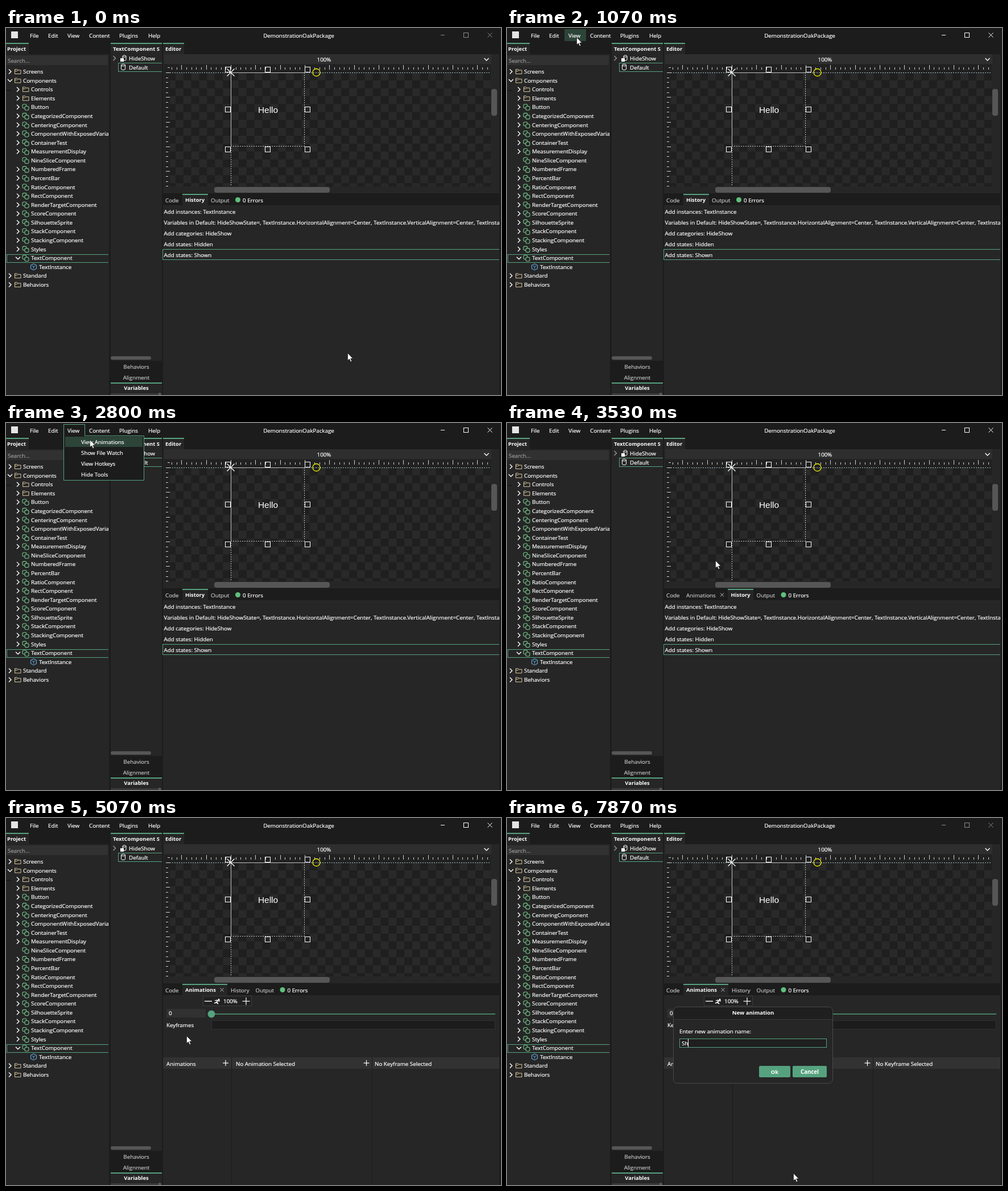
Animation of 870 by 644 pixels, one loop 8000 ms. Source, as an HTML page with a canvas:

```html
<!DOCTYPE html>
<html lang="en">
<head>
<meta charset="utf-8">
<title>Animation editor</title>
<style>
html, body { margin: 0; width: 100%; height: 100%; overflow: hidden; background: #1c1c1c; }
canvas { display: block; width: 870px; height: 644px; }
</style>
</head>
<body>
<canvas id="stage" width="870" height="644"></canvas>
<script>
const ctx = document.getElementById('stage').getContext('2d');
const LOOP = 8000, STEP = 1000 / 15;
const SANS = '"Open Sans", "Noto Sans", sans-serif';
const C = {
  chrome: '#1c1c1c', panel: '#262626', field: '#313131', green: '#56a27f', hover: '#2d4439',
  text: '#ffffff', soft: '#c4c4c4', dim: '#8a8a8a', thumb: '#565656', folder: '#d9c79c',
  component: '#74c78c', cube: '#62a8dc', error: '#e88282'
};

function rect(x, y, w, h, color) {
  ctx.fillStyle = color;
  ctx.fillRect(x, y, w, h);
}

function frame(x, y, w, h, color) {
  ctx.strokeStyle = color;
  ctx.lineWidth = 1;
  ctx.strokeRect(x + 0.5, y + 0.5, w - 1, h - 1);
}

function pill(x, y, w, h, r, color) {
  ctx.fillStyle = color;
  ctx.beginPath();
  ctx.roundRect(x, y, w, h, r);
  ctx.fill();
}

function disc(x, y, r, color) {
  ctx.fillStyle = color;
  ctx.beginPath();
  ctx.arc(x, y, r, 0, 7);
  ctx.fill();
}

// Points are a flat list: x, y, x, y ...
function line(points, color, width = 1, dash = []) {
  ctx.strokeStyle = color;
  ctx.lineWidth = width;
  ctx.setLineDash(dash);
  ctx.beginPath();
  for (let i = 0; i < points.length; i += 2) ctx.lineTo(points[i], points[i + 1]);
  ctx.stroke();
  ctx.setLineDash([]);
}

// y is the middle of the capital letters; a hairline stroke firms up the small type.
function label(s, x, y, { color = C.text, bold = false, size = bold ? 9.4 : 9.8, align = 'left' } = {}) {
  const base = Math.round(y + size * 0.36);
  ctx.font = `${bold ? 700 : 400} ${size}px ${SANS}`;
  ctx.textAlign = align;
  ctx.fillStyle = ctx.strokeStyle = color;
  ctx.lineWidth = 0.22;
  ctx.fillText(s, x, base);
  if (!bold) ctx.strokeText(s, x, base);
}

function clipped(x, y, w, h, draw) {
  ctx.save();
  ctx.beginPath();
  ctx.rect(x, y, w, h);
  ctx.clip();
  draw();
  ctx.restore();
}

function chevron(x, y, open, color = C.text) {
  line(open ? [x - 4, y - 2, x, y + 2, x + 4, y - 2] : [x - 2, y - 4, x + 2, y, x - 2, y + 4], color, 1.4);
}

function plus(x, y, r, color = C.text) {
  line([x - r, y, x + r, y], color, 1.2);
  line([x, y - r, x, y + r], color, 1.2);
}

function cross(x, y, r, color, width = 1) {
  line([x - r, y - r, x + r, y + r], color, width);
  line([x - r, y + r, x + r, y - r], color, width);
}

function activeTab(x, y, w, h) {
  rect(x, y, w, h, C.panel);
  rect(x, y, w, 2, C.green);
}

const icons = {
  folder(x, y) {
    line([x - 5, y + 4, x - 5, y - 4, x - 1, y - 4, x + 0.5, y - 2.5, x + 5.5, y - 2.5,
      x + 5.5, y + 4, x - 5, y + 4, x - 5, y - 1, x - 1, y - 1, x + 0.5, y - 2.5], C.folder);
  },
  component(x, y) {
    ctx.strokeStyle = C.component;
    ctx.lineWidth = 1.1;
    ctx.beginPath();
    ctx.roundRect(x - 5.5, y - 5, 7, 7, 2.5);
    ctx.stroke();
    ctx.beginPath();
    ctx.roundRect(x - 1.5, y - 1.5, 7, 7, 2.5);
    ctx.fillStyle = C.panel;
    ctx.fill();
    ctx.stroke();
  },
  cube(x, y) {
    line([x, y - 5.5, x + 5, y - 3, x + 5, y + 3, x, y + 5.5, x - 5, y + 3, x - 5, y - 3, x, y - 5.5], C.cube, 1.1);
    line([x - 3, y - 2, x, y - 0.5, x + 3, y - 2], C.cube);
    line([x, y - 0.5, x, y + 3], C.cube);
  },
  drum(x, y, r = 3.5) {
    ctx.strokeStyle = C.text;
    ctx.lineWidth = 1;
    ctx.beginPath();
    ctx.ellipse(x, y - r, r, 1.6, 0, 0, 7);
    ctx.moveTo(x - r, y - r);
    ctx.lineTo(x - r, y + r);
    ctx.ellipse(x, y + r, r, 1.6, 0, Math.PI, 0, true);
    ctx.lineTo(x + r, y - r);
    ctx.stroke();
  },
  runner(x, y) {
    disc(x + 3, y - 3.5, 1.5, C.text);
    line([x - 4, y - 1, x - 1, y - 2.5, x + 2, y - 1, x + 5, y - 1], C.text, 1.3);
    line([x + 1, y - 2, x - 1, y + 1.5, x + 2, y + 4], C.text, 1.8);
    line([x - 1, y + 1.5, x - 5, y + 3], C.text, 1.5);
  }
};

const components = ['Button', 'CategorizedComponent', 'CenteringComponent', 'ComponentWithExposedVariable',
  'ContainerTest', 'MeasurementDisplay', 'NineSliceComponent', 'NumberedFrame', 'PercentBar', 'RatioComponent',
  'RectComponent', 'RenderTargetComponent', 'ScoreComponent', 'SilhouetteSprite', 'StackComponent',
  'StackingComponent', 'Styles', 'TextComponent'];
const tree = [
  [0, 'Screens', 'folder'], [0, 'Components', 'folder'], [1, 'Controls', 'folder'], [1, 'Elements', 'folder'],
  ...components.map(name => [1, name, 'component']),
  [2, 'TextInstance', 'cube'], [0, 'Standard', 'folder'], [0, 'Behaviors', 'folder']
];
const leaves = ['NineSliceComponent', 'TextInstance'];
const opened = ['Components', 'TextComponent'];

function drawTitleBar(bright) {
  rect(9, 6, 12, 12, '#e4e4e4');
  const menu = { File: 42, Edit: 74, View: 108, Content: 146, Plugins: 199, Help: 250 };
  for (const name in menu) label(name, menu[name], 13);
  label('DemonstrationOakPackage', 514.5, 13, { align: 'center' });
  const color = bright ? C.text : C.dim;
  line([764, 12.5, 771, 12.5], color);
  frame(804, 8, 9, 9, color);
  cross(850.5, 12.5, 4, color);
}

function drawProject() {
  rect(0, 46, 181, 598, C.panel);
  activeTab(0, 26, 40, 21);
  label('Project', 2, 36.5, { bold: true });
  rect(0, 48, 179, 17, C.field);
  label('Search...', 3, 57, { color: '#9c9c9c' });
  rect(0, 109, 9, 1, '#101010');
  clipped(0, 66, 180, 578, () => {
    tree.forEach(([depth, name, icon], i) => {
      const y = 76.5 + i * 15.58, x = 7 + depth * 14;
      if (name === 'TextComponent') frame(1, 397, 190, 15, C.green);
      if (!leaves.includes(name)) chevron(x, y, opened.includes(name));
      icons[icon](x + 13.5, y);
      label(name, x + 23, y);
    });
  });
}

function drawStates() {
  rect(184, 46, 90, 538, C.panel);
  activeTab(184, 26, 90, 21);
  clipped(184, 26, 86, 20, () => label('TextComponent States', 188, 36.5, { bold: true }));
  chevron(190.5, 53, false, '#999');
  icons.drum(208, 52.5, 3);
  rect(201, 53, 6, 6, C.text);
  label('HideShow', 216, 53.5);
  clipped(190, 58, 84, 22, () => frame(197, 61, 90, 16, C.green));
  icons.drum(206, 68.5);
  label('Default', 216, 69);
  pill(184, 576, 71, 6, 3, C.thumb);
  label('Behaviors', 229, 594, { color: C.soft, align: 'center' });
  label('Alignment', 229, 613, { color: C.soft, align: 'center' });
  activeTab(184, 622, 90, 22);
  label('Variables', 229, 632, { bold: true, align: 'center' });
  rect(184, 641, 82, 3, '#3a3a3a');
  disc(270, 643, 3, C.thumb);
}

function drawEditor() {
  rect(276, 46, 591, 244, C.panel);
  activeTab(276, 26, 37, 21);
  label('Editor', 280, 36.5, { bold: true });
  rect(278, 46, 575, 17, '#2e2e2e');
  label('100%', 559, 55, { align: 'center' });
  chevron(844.5, 55, true);

  const ox = 395, oy = 78, cell = 13.87, tick = 8.667;
  const ruler = '#d0d0d0', guide = '#c4c4c4', dots = [2, 2];
  clipped(278, 64, 574, 214, () => {
    rect(278, 64, 574, 214, '#1f1f1f');
    ctx.fillStyle = '#292929';
    for (let r = 0; r < 15; r++)
      for (let c = -8; c < 34; c++)
        if ((r + c) % 2) ctx.fillRect(ox + c * cell, oy + r * cell, cell, cell);
    rect(278, 64, 574, 13, '#212121');
    rect(278, 64, 10, 214, '#212121');
    for (let i = -12; i < 53; i++) {
      const x = Math.round(ox + i * tick) + 0.5;
      line([x, i % 5 ? 69 : 65, x, 73], ruler);
    }
    for (let i = 0; i < 24; i++) {
      const y = Math.round(oy + i * tick) + 0.5;
      line([281, y, i % 5 ? 285 : 288, y], ruler);
    }
    line([284, 69.5, 288, 69.5], ruler);
    line([288, 78.5, 852, 78.5], '#a9c4cc', 1, dots);
    line([395.5, 78, 395.5, 278], guide, 1, dots);
  });
  line([525, 78.5, 395.5, 78.5, 395.5, 208], guide);
  line([395, 207.5, 525, 207.5], guide, 1, dots);
  line([524.5, 78, 524.5, 208], guide, 1, dots);
  for (const x of [390, 460, 530])
    for (const y of [73, 143, 213])
      if (x !== 460 || y !== 143) frame(x - 5, y - 5, 10, 10, '#fff');
  cross(395, 78, 6.5, '#fff', 1.2);
  ctx.strokeStyle = '#f4f000';
  ctx.lineWidth = 1.3;
  ctx.beginPath();
  ctx.arc(545.5, 78, 6.5, 0, 7);
  ctx.stroke();
  ctx.font = '15.4px "Liberation Sans", Arial, sans-serif';
  ctx.textAlign = 'center';
  ctx.fillStyle = '#fff';
  ctx.fillText('Hello', 460.5, 149);
  pill(853, 107, 10, 47, 4, C.thumb);
  pill(366, 279, 203, 10, 4, C.thumb);
}

function drawTabs(added, animating) {
  const shift = added ? 78.5 : 0;
  const passive = { color: C.soft };
  rect(276, 311, 591, 333, C.panel);
  label('Code', 280, 302, passive);
  if (animating) {
    activeTab(310, 291, 79, 21);
    label('Animations', 315, 302, { bold: true });
    cross(379.5, 301.5, 3, C.soft);
    label('History', 395, 302, passive);
  } else {
    if (added) {
      label('Animations', 315, 302, passive);
      cross(378, 301.5, 3, C.soft);
    }
    activeTab(310 + Math.floor(shift), 291, 45, 21);
    label('History', 315 + shift, 302, { bold: true });
  }
  label('Output', 360 + shift, 302, passive);
  disc(407.5 + shift, 301.5, 4.5, '#5fc07c');
  label('0 Errors', 416 + shift, 302);
}

function drawHistory() {
  const rows = ['Add instances: TextInstance',
    'Variables in Default: HideShowState=, TextInstance.HorizontalAlignment=Center, ' +
    'TextInstance.VerticalAlignment=Center, TextInstance.Width=0',
    'Add categories: HideShow', 'Add states: Hidden', 'Add states: Shown'];
  clipped(275, 312, 592, 332, () => {
    rows.forEach((row, i) => label(row, 277.5, 322 + i * 19));
    frame(275, 388, 610, 19, C.green);
  });
}

function drawAnimations() {
  rect(347, 312, 84, 18, '#212121');
  frame(346, 312, 86, 18, '#3c3c3c');
  line([349, 321.5, 362, 321.5], C.text, 1.4);
  icons.runner(371, 322);
  label('100%', 394.5, 321.5, { align: 'center' });
  plus(422, 321.5, 6.5);
  rect(282, 335, 69, 15, C.field);
  label('0', 286, 342.5);
  rect(361, 343, 499, 2, '#43805f');
  disc(361, 344, 6.5, C.green);
  label('Keyframes', 282, 363.5);
  rect(361, 355, 499, 16, C.chrome);
  frame(361, 355, 499, 16, '#303030');
  rect(276, 420, 591, 20, '#323232');
  label('Animations', 282, 431);
  plus(386, 430, 5);
  label('No Animation Selected', 404, 431);
  plus(633.5, 430, 5);
  label('No Keyframe Selected', 648, 431);
  rect(396, 420, 1, 224, C.chrome);
  rect(643, 420, 1, 224, C.chrome);
}

function drawViewMenu(tip) {
  rect(101, 2, 38, 22, C.chrome);
  rect(101, 22, 142, 79, C.chrome);
  line([101.5, 101, 101.5, 2.5, 138.5, 2.5, 138.5, 22.5, 242.5, 22.5, 242.5, 100.5, 101.5, 100.5], C.green);
  if (tip.y > 24) rect(104, 24, 136, 18, C.hover);
  label('View', 108, 13);
  ['View Animations', 'Show File Watch', 'View Hotkeys', 'Hide Tools']
    .forEach((item, i) => label(item, 132, 33 + i * 19));
}

function drawDialog(typed, caretOn) {
  pill(292, 331, 281, 135, 7, C.panel);
  pill(292, 331, 281, 22, [7, 7, 0, 0], '#1f1f1f');
  rect(292, 353, 281, 1, '#3a3a3a');
  ctx.strokeStyle = '#494949';
  ctx.lineWidth = 1;
  ctx.beginPath();
  ctx.roundRect(292.5, 331.5, 280, 134, 7);
  ctx.stroke();
  label('New animation', 432.5, 342, { bold: true, size: 9.6, align: 'center' });
  label('Enter new animation name:', 303, 374);
  rect(303, 387, 259, 16, '#1f1f1f');
  frame(303, 387, 259, 16, C.green);
  label(typed, 307, 395);
  if (caretOn) rect(Math.round(307 + ctx.measureText(typed).width), 388, 1, 14, '#fff');
  if (!typed) label('Animation names cannot be empty', 303, 415, { color: C.error, size: 8.46 });
  pill(443, 435, 55, 20, 2, typed ? C.green : '#477f65');
  pill(502, 435, 60, 20, 2, C.green);
  label('Ok', 470.5, 445.5, { bold: true, align: 'center', color: typed ? '#fff' : '#a9bdb2' });
  label('Cancel', 532, 445.5, { bold: true, size: 9.7, align: 'center', color: '#fff' });
}

// Pointer moves: start, end, then a quadratic path.
const moves = [
  [0, 870, 600, 570, -250, 220, 122, 16],
  [2000, 2870, 122, 16, 129, 14.6, 147, 29],
  [3200, 4070, 147, 29, 435, 165, 344, 308],
  [4800, 5670, 344, 303, 243.6, 355, 383, 429],
  [5670, 5800, 383, 429, 384, 430, 385, 431],
  [6600, 7000, 385, 431, 446, 535, 503, 623]
];

function pointerAt(t) {
  const [from, to, x0, y0, x1, y1, x2, y2] = moves.filter(m => m[0] <= t).pop();
  const u = Math.min(1, (t - from) / (to - from));
  const p = 1 - (1 - u) ** 3, q = 1 - p;
  const mix = (a, b, c) => q * q * a + 2 * p * q * b + p * p * c;
  return { x: Math.round(mix(x0, x1, x2)), y: Math.round(mix(y0, y1, y2)) };
}

function drawPointer({ x, y }) {
  ctx.beginPath();
  for (const [dx, dy] of [[0, 0], [0, 13], [3, 10.3], [5.2, 15.2], [7.3, 14.3], [5.2, 9.6], [9.2, 9.4]])
    ctx.lineTo(x + 0.5 + dx, y + 0.5 + dy);
  ctx.closePath();
  ctx.fillStyle = '#fff';
  ctx.fill();
  ctx.strokeStyle = '#101010';
  ctx.lineWidth = 0.7;
  ctx.stroke();
}

function draw(time) {
  const t = Math.floor((time + 4) / STEP) * STEP + 1;
  const tip = pointerAt(t - 1);
  const animating = t >= 4266, dialog = t >= 6266;
  rect(0, 0, 870, 644, C.chrome);
  if (tip.x >= 101 && tip.x < 139 && tip.y >= 2 && tip.y < 23) rect(101, 2, 38, 21, C.hover);
  drawTitleBar(t >= 1066 && !dialog);
  drawProject();
  drawStates();
  drawEditor();
  drawTabs(t >= 2866, animating);
  if (animating) drawAnimations();
  else drawHistory();
  if (t >= 1400 && t < 2866) drawViewMenu(tip);
  if (dialog) {
    const typed = t >= 7866 ? 'Sh' : t >= 7733 ? 'S' : '';
    drawDialog(typed, t < 6800 || t >= 7333);
  }
  drawPointer(tip);
}

const start = performance.now();
function tick() {
  draw((performance.now() - start) % LOOP);
  requestAnimationFrame(tick);
}
tick();
</script>
</body>
</html>
```
